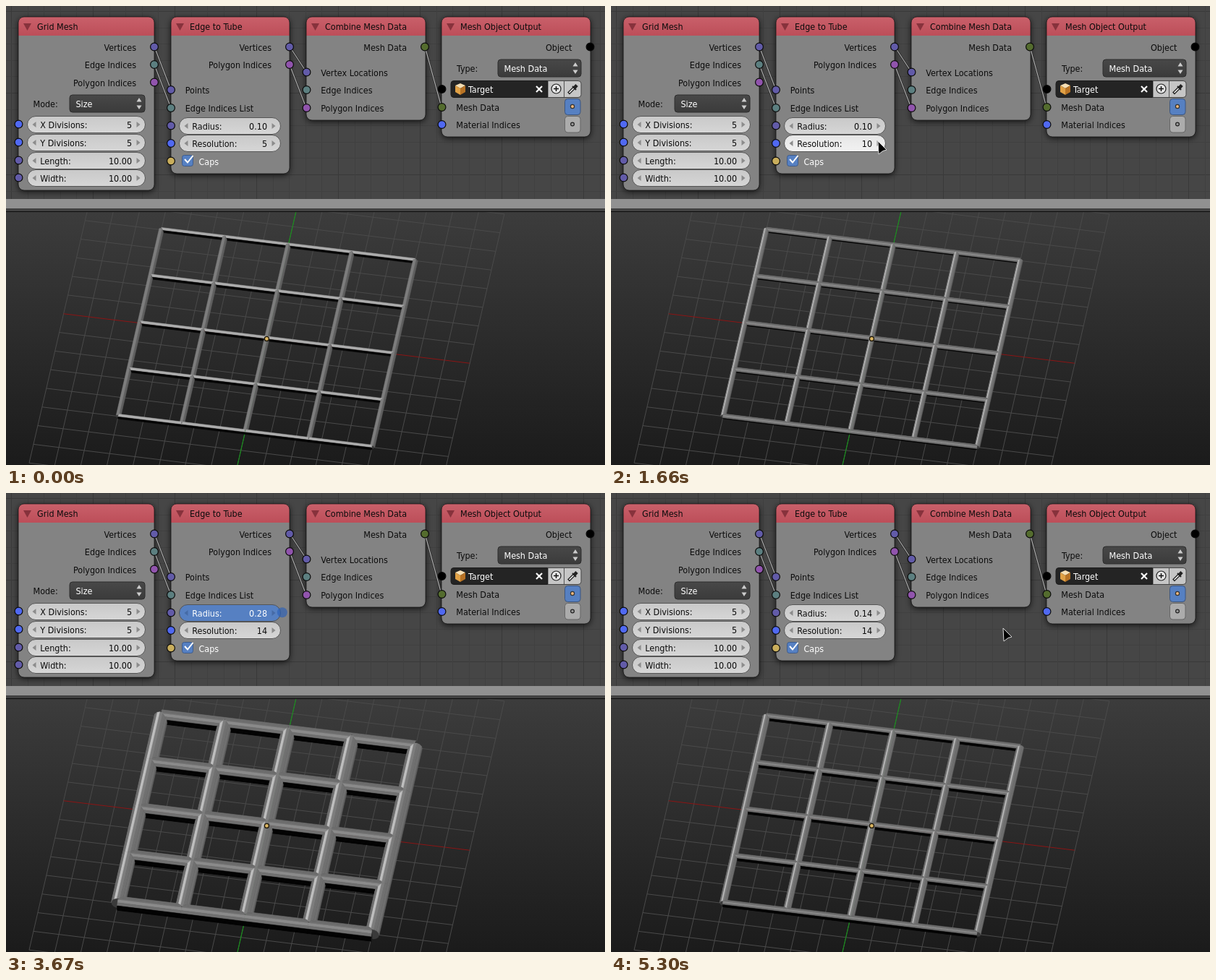
Animation of 828x635 px, one loop 5340 ms. Source, as an HTML page with a canvas:

```html
<!DOCTYPE html>
<html>
<head>
<meta charset="utf-8">
<style>
  html, body { margin: 0; width: 100%; height: 100%; overflow: hidden; background: #222; }
  canvas { display: block; }
</style>
</head>
<body>
<canvas id="stage" width="828" height="635"></canvas>
<script>
const ctx = document.getElementById('stage').getContext('2d');
const LOOP = 5340, TAU = Math.PI * 2;
const VIOLET = '#625ba8', TEAL = '#5c7f80', PURPLE = '#9154ad', BLUE = '#5069f2',
      YELLOW = '#c9ae5c', GREEN = '#546c2e', BLACK = '#000', ACTIVE = '#5680c2';

// The condensed face is preferred; the size follows the face that is found.
const font = size => `condensed ${size}px "DejaVu Sans Condensed", "DejaVu Sans", sans-serif`;
ctx.font = font(100);
const FONT = font(11200 / ctx.measureText('Mesh Object Output').width);

// ---------- drawing helpers ----------
function shape(points, fill, stroke, width = 1) {
  ctx.beginPath();
  points.forEach(p => ctx.lineTo(p[0], p[1]));
  ctx.closePath();
  if (fill) { ctx.fillStyle = fill; ctx.fill(); }
  if (stroke) { ctx.strokeStyle = stroke; ctx.lineWidth = width; ctx.stroke(); }
}
function line(x1, y1, x2, y2, color, width = 1) {
  ctx.beginPath();
  ctx.moveTo(x1, y1);
  ctx.lineTo(x2, y2);
  ctx.strokeStyle = color;
  ctx.lineWidth = width;
  ctx.stroke();
}
function box(x, y, w, h, r, fill, stroke) {
  ctx.beginPath();
  ctx.roundRect(x, y, w, h, r);
  ctx.fillStyle = fill;
  ctx.fill();
  if (stroke) { ctx.strokeStyle = stroke; ctx.lineWidth = 1; ctx.stroke(); }
}
function dot(x, y, r, fill, stroke) {
  ctx.beginPath();
  ctx.arc(x, y, r, 0, TAU);
  ctx.fillStyle = fill;
  ctx.fill();
  if (stroke) { ctx.strokeStyle = stroke; ctx.lineWidth = 1.2; ctx.stroke(); }
}
function text(str, x, y, color = '#0c0c0c', align = 'left') {
  ctx.font = FONT;
  ctx.textAlign = align;
  ctx.fillStyle = color;
  ctx.fillText(str, x, Math.round(y + 4.5));
}
function vertical(y1, y2, top, bottom) {
  const g = ctx.createLinearGradient(0, y1, 0, y2);
  g.addColorStop(0, top);
  g.addColorStop(1, bottom);
  return g;
}
const socket = (x, y, color) => dot(x, y, 5.4, color, '#0a0a0a');

// ---------- node editor ----------
function node(x, w, h, title) {
  ctx.save();
  ctx.shadowColor = 'rgba(0,0,0,.75)';
  ctx.shadowBlur = 9;
  ctx.shadowOffsetY = 2;
  box(x, 15, w, h, 8, '#838383');
  ctx.restore();
  box(x, 15, w, 26, [8, 8, 0, 0], vertical(15, 41, '#c9606a', '#bc4e59'));
  ctx.beginPath();
  ctx.roundRect(x, 15, w, h, 8);
  ctx.strokeStyle = 'rgba(20,20,20,.75)';
  ctx.lineWidth = 1;
  ctx.stroke();
  shape([[x + 7, 24], [x + 18, 24], [x + 12.5, 34]], '#87323c');
  text(title, x + 26, 28.5);
}
function numberField(x, w, y, label, value, state) {
  const fill = state === 'active' ? ACTIVE
    : state === 'hover' ? vertical(y - 11, y + 11, '#e6e6e6', '#f2f2f2')
    : vertical(y - 11, y + 11, '#c9c9c9', '#d6d6d6');
  const color = state === 'active' ? '#fff' : undefined;
  const arrow = state === 'active' ? '#466ba6' : '#8c8c8c';
  box(x, y - 11.5, w, 23, 11.5, fill, '#555');
  const r = x + w;
  shape([[x + 7, y], [x + 12, y - 4], [x + 12, y + 4]], arrow);
  shape([[r - 7, y], [r - 12, y - 4], [r - 12, y + 4]], arrow);
  text(label, x + 17.8, y + .5, color);
  text(value, r - 18.5, y + .5, color, 'right');
}
function menu(x, y, w, label) {
  box(x, y - 12, w, 24, 4, vertical(y - 12, y + 12, '#484848', '#3b3b3b'), '#2c2c2c');
  text(label, x + 8.5, y + .5, '#fff');
  const a = x + w - 8;
  shape([[a - 3.5, y - 2.5], [a + 3.5, y - 2.5], [a, y - 8]], '#ccc');
  shape([[a - 3.5, y + 2.5], [a + 3.5, y + 2.5], [a, y + 8]], '#ccc');
}
function editor(scene) {
  ctx.fillStyle = '#464646';
  ctx.fillRect(0, 0, 828, 267);
  for (let i = 0; i < 40; i++) {
    const p = Math.round(7 + i * 22.6) + .5, color = i % 5 ? '#404040' : '#393939';
    line(p, 0, p, 267, color);
    if (p < 267) line(0, p, 828, p, color);
  }

  node(17, 188, 240, 'Grid Mesh');
  node(228, 164, 217, 'Edge to Tube');
  node(415, 165, 143, 'Combine Mesh Data');
  node(602, 206, 166, 'Mesh Object Output');

  for (const link of [[205, 56, 228, 116], [205, 81, 228, 141], [392, 56, 415, 91],
                      [392, 81, 415, 141], [579, 56, 602, 140]]) {
    line(...link, '#222', 2.4);
    line(...link, '#b4b4b4', 1.1);
  }

  const output = (label, x, y, color) => {
    text(label, x - 25, y + .9, undefined, 'right');
    socket(x, y, color);
  };
  const input = (label, x, y, color) => {
    if (label) text(label, x + 19.8, y + .7);
    socket(x, y, color);
  };

  output('Vertices', 205, 56.5, VIOLET);
  output('Edge Indices', 205, 81, TEAL);
  output('Polygon Indices', 205, 105.5, PURPLE);
  text('Mode:', 37.5, 135.5);
  menu(88, 135, 104, 'Size');
  [['X Divisions:', '5', BLUE], ['Y Divisions:', '5', BLUE],
   ['Length:', '10.00', VIOLET], ['Width:', '10.00', VIOLET]].forEach(([label, value, color], i) => {
    const y = Math.round(164 + i * 24.8);
    numberField(29.5, 163, y, label, value);
    socket(17.5, y - .5, color);
  });

  output('Vertices', 392, 56.5, VIOLET);
  output('Polygon Indices', 392, 81, PURPLE);
  input('Points', 228, 116, VIOLET);
  input('Edge Indices List', 228, 141, TEAL);
  numberField(239.5, 140, 166, 'Radius:', scene.radius.toFixed(2), scene.radiusState);
  numberField(239.5, 140, 190, 'Resolution:', scene.sides, scene.sidesState);
  input('', 228, 165.5, VIOLET);
  input('', 228, 190, BLUE);
  input('', 228, 214.5, YELLOW);
  box(243.5, 206.5, 15, 15, 3, ACTIVE, '#3d5b8b');
  ctx.beginPath();
  [[247, 212], [251, 216.5], [258.5, 207]].forEach(p => ctx.lineTo(...p));
  ctx.strokeStyle = '#fff';
  ctx.lineWidth = 2;
  ctx.stroke();
  text('Caps', 266.5, 215.5, '#fff');

  output('Mesh Data', 579, 56.5, GREEN);
  input('Vertex Locations', 415.5, 91.5, VIOLET);
  input('Edge Indices', 415.5, 116, TEAL);
  input('Polygon Indices', 415.5, 141, PURPLE);

  output('Object', 807.5, 56.5, BLACK);
  text('Type:', 623, 86.5);
  menu(680, 86, 115, 'Mesh Data');
  input('', 602.5, 115, BLACK);
  input('Mesh Data', 602.5, 140, GREEN);
  input('Material Indices', 602.5, 164, BLUE);

  box(749, 103.5, 46, 23, [0, 4, 4, 0], '#c6c6c6', '#444');
  line(771.5, 104, 771.5, 126, '#555');
  box(615, 103.5, 133.5, 23, [4, 0, 0, 4], '#242424', '#1c1c1c');
  shape([[628, 107], [635, 110], [628, 114], [621, 110]], '#f6dfb4');
  shape([[621, 110], [628, 114], [628, 123], [621, 119]], '#e0a045');
  shape([[635, 110], [628, 114], [628, 123], [635, 119]], '#b87325');
  text('Target', 639, 115.5, '#fff');
  line(733, 111, 741, 119, '#fff', 2.2);
  line(741, 111, 733, 119, '#fff', 2.2);
  dot(760.5, 114.5, 6.5, '#e6e6e6', '#222');
  line(757, 114.5, 764, 114.5, '#111', 1.5);
  line(760.5, 111, 760.5, 118, '#111', 1.5);
  line(777.5, 121, 785, 113.5, '#222', 4);
  line(778.5, 120, 785, 113.5, '#eee', 1.6);
  line(783, 111, 788, 116, '#222', 2);
  line(785.5, 113.5, 789, 109.5, '#222', 4.5);
  box(772.5, 128.5, 21.5, 22, 4, ACTIVE, '#3b5580');
  dot(783, 139, 2.6, '#efb87e', '#333');
  box(772.5, 152.5, 21.5, 22.5, 4, '#acacac', '#666');
  dot(783, 163.5, 2.4, '#999', '#222');
}

// ---------- 3D view ----------
const project = (x, y, z = 0) => [360.4 + 35.1 * x + 5.95 * y, 460 + 4.28 * x - 25.8 * y - 24.3 * z];

// Brightness by facet angle to the viewer: [upper limit, grey], from the far side to the near side.
const SHADES = {
  x: [[-36, 110], [-22, 172], [0, 138], [30, 112], [90, 3]],
  y: [[-46, 112], [-32, 190], [10, 125], [45, 112], [70, 95], [90, 6]]
};
const VIEW_ANGLE = { x: 42.5, y: 8.8 };
const grey = v => `rgb(${v},${v},${v})`;

// One mitred prism between two joints of the cage.
function tube(axis, lane, step, sides, radius) {
  const alongX = axis === 'x', centre = lane * 2.5 - 5, start = step * 2.5 - 5, end = start + 2.5;
  const at = (t, u, z) => alongX ? project(t, centre + u, z) : project(centre + u, t, z);
  const joined = u => u > 0 ? lane < 4 : lane > 0;
  const ring = Array.from({ length: sides + 1 }, (_, i) =>
    [radius * Math.cos(TAU * i / sides), radius * Math.sin(TAU * i / sides)]);
  if (alongX ? step === 3 : step === 0) {
    const t = alongX ? end : start;
    shape(ring.map(([u, z]) => at(t, joined(u) ? 0 : u, z)), alongX ? '#1c1c1c' : '#3a3a3a');
  }
  for (let i = 0; i < sides; i++) {
    const turn = (i + .5) * 360 / sides - 90;
    const angle = ((alongX ? turn : -turn) - VIEW_ANGLE[axis] + 540) % 360 - 180;
    if (Math.abs(angle) >= 90) continue;
    const color = grey(SHADES[axis].find(s => angle <= s[0])[1]);
    const [u, z] = ring[i], [v, w] = ring[i + 1];
    // A flat top facet of a y tube runs through the joint.
    const through = !alongX && u * v < -1e-6;
    const mitre = side => joined(side) && !through ? Math.abs(side) : 0;
    shape([at(start + mitre(u), u, z), at(end - mitre(u), u, z),
           at(end - mitre(v), v, w), at(start + mitre(v), v, w)], color, color, .5);
  }
}
function viewport(scene) {
  ctx.fillStyle = vertical(285, 635, '#3c3c3c', '#1b1b1b');
  ctx.fillRect(0, 284, 828, 351);
  for (let i = -8; i <= 8; i++) {
    line(...project(i, -8), ...project(i, 8), i ? '#4a4a4a' : '#1f8a22');
    line(...project(-8, i), ...project(8, i), i ? '#4a4a4a' : '#8c1414');
  }
  line(...project(0, -8), ...project(0, 8), '#1f8a22');
  for (let row = 4; row >= 0; row--) {
    for (let k = 0; k < 4; k++) tube('x', row, k, scene.sides, scene.radius);
    if (row) for (let lane = 0; lane < 5; lane++) tube('y', lane, row - 1, scene.sides, scene.radius);
  }
  dot(360.4, 460.4, 3, '#dcb662', '#1a1408');

  ctx.fillStyle = '#919191';
  ctx.fillRect(0, 267, 828, 13);
  ctx.fillStyle = '#424242';
  ctx.fillRect(0, 280, 828, 4);
  ctx.fillStyle = '#0c0c0c';
  ctx.fillRect(0, 284, 828, 1);
}

// ---------- timeline ----------
const PRESS = 3240, RELEASE = 4880, FIRST_CLICK = 765, CLICK = 185;
// Pointer path: time, x, y
const PATH = [[430, 520, 232], [700, 369, 187], [2500, 369, 187], [2990, 330, 184], [3150, 317, 160],
              [PRESS, 317, 160], [3520, 346, 165], [4000, 460, 166], [4150, 460, 162], [4390, 390, 160],
              [4690, 343, 158], [4850, 332, 158], [4940, 332, 158], [5250, 542, 187], [LOOP, 542, 187]];

function pointerAt(t) {
  const i = Math.max(1, PATH.findIndex(p => p[0] > t));
  const [t0, x0, y0] = PATH[i - 1], [t1, x1, y1] = PATH[i];
  const f = Math.max(0, (t - t0) / (t1 - t0));
  return [x0 + (x1 - x0) * f, y0 + (y1 - y0) * f];
}
function sceneAt(t) {
  const [x, y] = pointerAt(t);
  const dragging = t >= PRESS && t < RELEASE;
  const clicks = Math.max(0, Math.min(9, Math.floor((t - FIRST_CLICK) / CLICK) + 1));
  const phase = t - FIRST_CLICK - (clicks - 1) * CLICK;
  const clicking = clicks > 0 && phase < 80;
  const betweenClicks = clicks > 0 && clicks < 9 && phase >= 80 && phase < 150;
  return {
    x, y, clicking, dragging,
    sides: 5 + clicks,
    radius: t < PRESS ? .1 : t < RELEASE ? .1 + (x - 317) / 366 : .14,
    sidesState: t > 640 && t < 3060 ? 'hover' : '',
    radiusState: dragging ? 'active' : t >= 3060 && t < 4980 ? 'hover' : '',
    pointer: t >= 430 && !dragging && !betweenClicks
  };
}
function draw(now) {
  const scene = sceneAt(now % LOOP), { x, y } = scene;
  viewport(scene);
  editor(scene);
  if (scene.clicking) dot(x, y + 1, 9, 'rgba(70,135,220,.45)');
  if (scene.dragging) dot(x, y, 7, 'rgba(42,95,185,.65)');
  if (scene.pointer) {
    shape([[x, y], [x + 12, y + 12], [x + 7, y + 13.5], [x + 1, y + 18]], '#000', '#ddd', 1);
  }
  requestAnimationFrame(() => draw(performance.now()));
}
draw(0);
</script>
</body>
</html>
```
